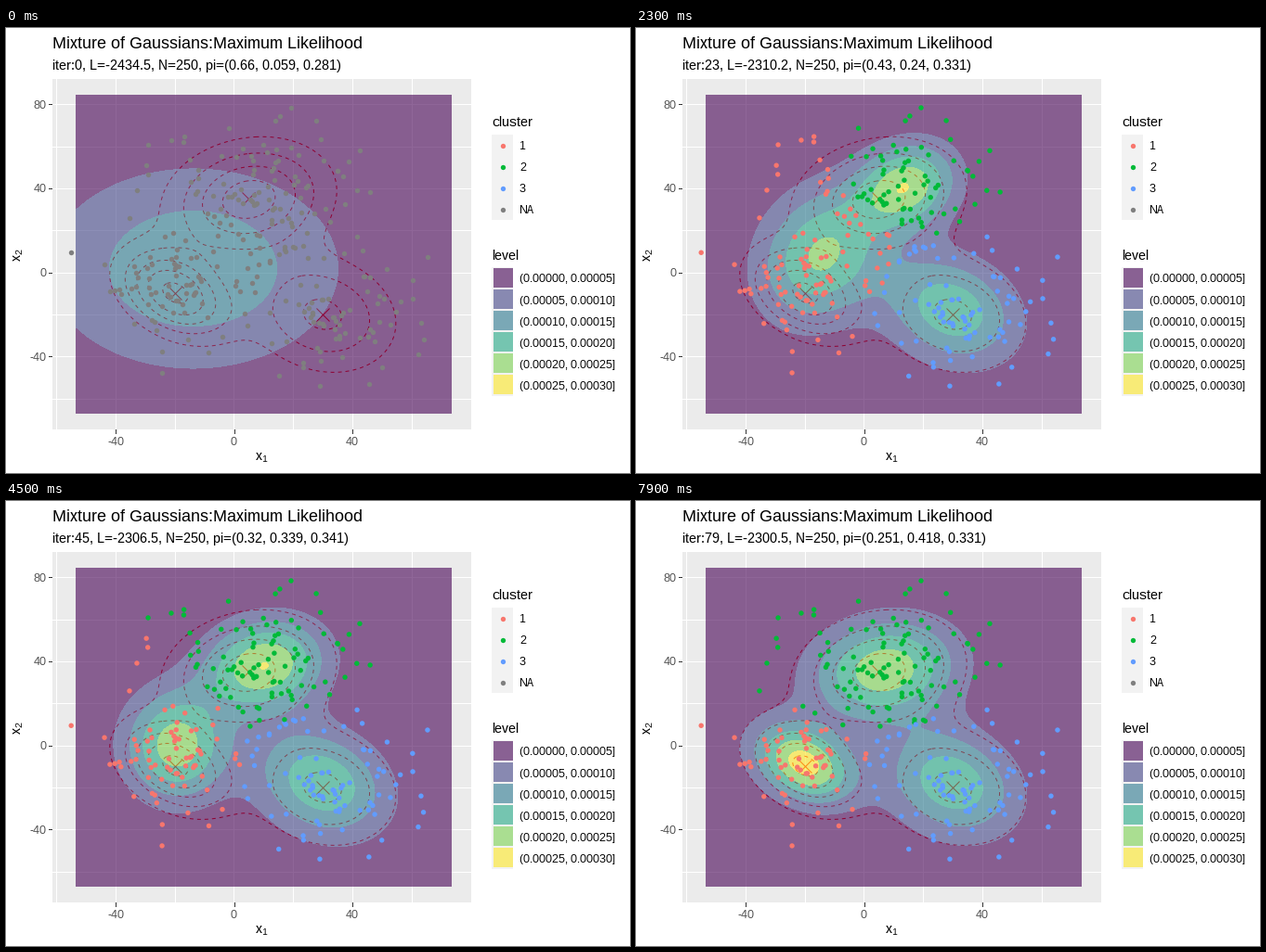
Write a matplotlib script that moves like this. It is 672 by 480 pixels and loops after 8000 ms.

```python
import numpy as np
import matplotlib.pyplot as plt
from matplotlib.animation import FuncAnimation
from matplotlib.colors import to_rgba_array
from matplotlib.patches import Rectangle

plt.rcParams.update({
    "font.family": "Liberation Sans",
    "mathtext.fontset": "custom",
    "mathtext.rm": "Liberation Sans",
    "text.hinting": "native",
    "text.hinting_factor": 1,
})

W, H, DPI = 672, 480, 96
FRAMES, INTERVAL = 80, 100
X0, Y0, KX, KY = 245.5, 263.8, 3.1875, 2.267  # data origin and scale in pixels
LEFT, TOP, RIGHT, BOTTOM = 50, 55, 501, 433
GREY, RED, GREEN, BLUE = "#7F7F7F", "#F8766D", "#00BA38", "#619CFF"
VIRIDIS = ["#440154", "#414487", "#2A788E", "#22A884", "#7AD151", "#FDE725"]
ALPHA = 0.6
STEP = 5e-5
HAIR = 0.75  # one pixel in points

# Milestones: iteration, log-likelihood, first and second weight
FIT = np.array([
    (0, -2434.5, .660, .059),
    (1, -2344.6, .645, .064),
    (6, -2331.2, .538, .122),
    (16, -2311.7, .471, .201),
    (30, -2308.7, .388, .278),
    (45, -2306.5, .320, .339),
    (54, -2303.2, .283, .378),
    (79, -2300.5, .251, .418),
])

# Shapes are mean x, mean y, sd x, sd y, correlation
START = np.array((-13.8, 1.9, 34, 33, 0))
CLOUD = np.array((8, 8, 22, 28, 0))
TRUTH = [
    (.25, -20, -10, 12, 13.6, -.35),
    (.41, 5, 35, 17, 17, .15),
    (.29, 30, -20, 16.1, 17.9, -.15),
]
OUTLIERS = [
    (-55, 9.5), (65.4, 7.4), (63.2, -24), (60.4, -12.4), (45.6, -53), (29, -54),
    (-24.3, -47.7), (19.3, 78.4), (15.5, 74.5), (27.8, 72.3), (42.5, 58),
    (46, 38.3), (37.5, 32.5), (-29, 60.8), (-21.2, 63), (-29.6, 51),
    (-32.8, 39.2), (-35.3, 26),
]


def distance(x, y, mx, my, sx, sy, rho):
    u, v = (x - mx) / sx, (y - my) / sy
    return (u * u - 2 * rho * u * v + v * v) / (1 - rho * rho)


def mixture(x, y, parts):
    layers = []
    for weight, *shape in parts:
        sx, sy, rho = shape[2:]
        peak = weight / (2 * np.pi * sx * sy * np.sqrt(1 - rho * rho))
        layers.append(peak * np.exp(-distance(x, y, *shape) / 2))
    return np.array(layers)


def blend(a, b, t):
    a, b = np.array(a), np.array(b)
    return a + (b - a) * np.array(t)


def progress(i):
    """Log-likelihood and weights; the last stretch converges."""
    if i > 54:
        i = 54 + 25 * (1 - np.exp(-3 * (i - 54) / 25)) / (1 - np.exp(-3))
    score, p, q = (np.interp(i, FIT[:, 0], col) for col in FIT[:, 1:].T)
    return score, (p, q, 1 - p - q)


def components(i):
    weights = progress(i)[1]
    if i == 0:
        shapes = [START] * 3
    else:
        # Shapes follow the first weight as it shrinks
        u = np.clip((.538 - weights[0]) / (.538 - .251), 0, 1)
        out = 1 - (1 - u) ** 2
        settle = 1 - np.exp(-max(i - 6, 0) / 4)
        shapes = [
            blend((-5, 11, 19.8, 23.5, .2), (-20.5, -8.5, 11.7, 13.2, -.3),
                  (out, u ** 2, out, u ** 2.5, u ** 3)),
            blend((16.8, 44.5, 11, 13.8, .62), (7, 36.3, 17, 16.8, .12),
                  (u ** 1.5, u, u ** 2.3, u ** 2.3, 1 - (1 - u) ** 6)),
            blend((24, -13, 18, 20, -.3), (29.8, -18, 15.6, 18.4, -.2), settle),
        ]
        early = max(6 - i, 0) / 6
        shapes = [blend(s, CLOUD, early) for s in shapes]
    return [(w, *s) for w, s in zip(weights, shapes)]


def observations():
    rng = np.random.default_rng(12)
    groups = [OUTLIERS]
    for (_, mx, my, sx, sy, rho), n in zip(components(FRAMES - 1), (61, 93, 78)):
        cov = [[sx * sx, rho * sx * sy], [rho * sx * sy, sy * sy]]
        pts = rng.multivariate_normal((mx, my), cov, 300)
        groups.append(pts[distance(*pts.T, mx, my, sx, sy, rho) < 6][:n])
    return np.vstack(groups)


fig = plt.figure(figsize=(W / DPI, H / DPI), dpi=DPI, facecolor="white")

stage = fig.add_axes([0, 0, 1, 1])
stage.set(xlim=(0, W), ylim=(H, 0))
stage.axis("off")


def label(x, y, s, size=9, color="black", **kw):
    return stage.text(x, y, s, fontsize=size, color=color, **kw)


def box(x, y, w, h, **kw):
    stage.add_patch(Rectangle((x, y), w, h, lw=0, **kw))


# Titles, ticks and axis labels
label(50, 22, "Mixture of Gaussians:Maximum Likelihood", 13.5)
subtitle = label(50, 45, "", 11.25)
tick = dict(color="#333333", lw=HAIR)
for v in (-40, 0, 40):
    x = X0 + KX * v
    stage.plot([x, x], [BOTTOM, BOTTOM + 3.7], **tick)
    label(x, 450.5, str(v), color="#4D4D4D", ha="center")
for v in (-40, 0, 40, 80):
    y = Y0 - KY * v
    stage.plot([LEFT - 3.7, LEFT], [y, y], **tick)
    label(43.5, y + 4.3, str(v), color="#4D4D4D", ha="right")
label(275, 467, r"$\mathrm{x_1}$", 11.25, ha="center")
label(14, 244, r"$\mathrm{x_2}$", 11.25, ha="center", va="center", rotation=90)

# Legends
label(523, 106, "cluster", 11.25)
for k, (name, color) in enumerate(zip(("1", "2", "3", "NA"), (RED, GREEN, BLUE, GREY))):
    y = 126.6 + 23.04 * k
    box(523.3, y - 11.52, 23.04, 23.04, fc="#F2F2F2")
    stage.plot([535], [y], "o", ms=4, mew=0, color=color)
    label(553, y + 4.5, name)
label(523, 250, "level", 11.25)
for k, color in enumerate(VIRIDIS):
    y = 270 + 23.04 * k
    box(523.3, y - 11.52, 23.04, 23.04, fc="#F2F2F2")
    box(525, y - 10.9, 21, 21, fc=color, alpha=ALPHA)
    label(553, y + 4.5, f"({k * STEP:.5f}, {(k + 1) * STEP:.5f}]")

# Plot panel
ax = fig.add_axes([LEFT / W, 1 - BOTTOM / H, (RIGHT - LEFT) / W, (BOTTOM - TOP) / H],
                  facecolor="#EBEBEB")
for spine in ax.spines.values():
    spine.set_visible(False)
for v in range(-60, 81, 20):
    if v < 80:
        ax.axvline(v, color="white", lw=HAIR, zorder=0)
    ax.axhline(v, color="white", lw=HAIR, zorder=0)

# One density sample per screen pixel of the shaded field
px, py = np.meshgrid(np.arange(75, 480) + .5, np.arange(72, 416) + .5)
gx, gy = (px - X0) / KX, (Y0 - py) / KY
extent = [(75 - X0) / KX, (480 - X0) / KX, (Y0 - 416) / KY, (Y0 - 72) / KY]
bands = np.round(to_rgba_array(VIRIDIS, ALPHA) * 255).astype(np.uint8)
field = ax.imshow(bands[np.zeros(gx.shape, int)], extent=extent, aspect="auto",
                  interpolation="nearest", zorder=2)

ax.contour(gx, gy, mixture(gx, gy, TRUTH).sum(0), levels=STEP * np.arange(1, 7),
           colors="red", linewidths=HAIR, linestyles=[(0, (4, 4))], zorder=1)
ax.plot([t[1] for t in TRUTH], [t[2] for t in TRUTH], "x", color="red",
        ms=11.2, mew=HAIR, zorder=1)

data = observations()
dots = ax.scatter(*data.T, s=16.5, lw=0, c=GREY, zorder=3)
palette = np.array([RED, GREEN, BLUE])
ax.set(xlim=((LEFT - X0) / KX, (RIGHT - X0) / KX),
       ylim=((Y0 - BOTTOM) / KY, (Y0 - TOP) / KY), xticks=[], yticks=[])


def draw(i):
    parts = components(i)
    density = mixture(gx, gy, parts).sum(0)
    field.set_data(bands[np.minimum(density / STEP, 5).astype(int)])
    owner = mixture(*data.T, parts).argmax(0)
    dots.set_facecolor(palette[owner] if i else GREY)
    score, weights = progress(i)
    pi = ", ".join(f"{round(w, 3):g}" for w in weights)
    subtitle.set_text(f"iter:{i}, L={round(score, 1):g}, N=250, pi=({pi})")
    return field, dots, subtitle


anim = FuncAnimation(fig, draw, frames=FRAMES, interval=INTERVAL, repeat=True,
                     repeat_delay=0, blit=False)
plt.show()
```
